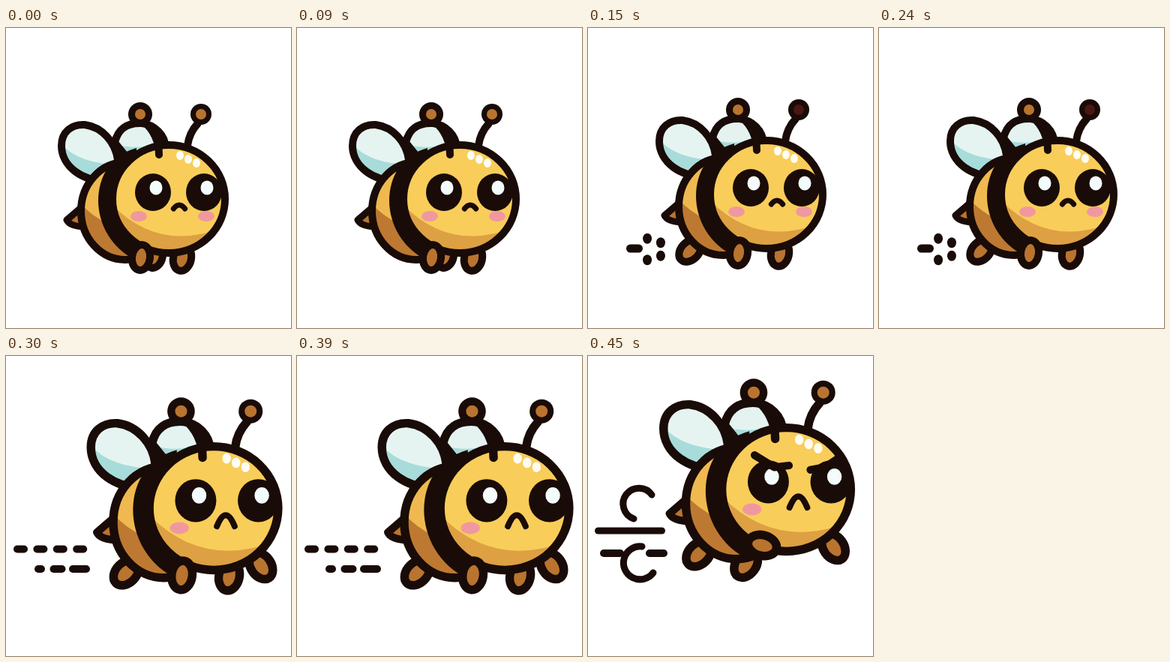
These frames come from a looping animation (380 px wide and 400 px high, 600 ms). An HTML page:

```html
<!DOCTYPE html>
<html lang="en">
<head>
<meta charset="utf-8">
<title>Bee</title>
<style>
  html, body { margin: 0; width: 100%; height: 100%; overflow: hidden; background: #fff; }
  svg { display: block; width: 380px; height: 400px; }
</style>
</head>
<body>
<svg id="stage" viewBox="0 0 380 400"></svg>
<script>
const INK = '#190b07', BROWN = '#b9742f', PINK = '#f0989f', STEP = 150;

const ellipse = (x, y, rx, ry = rx, fill = INK, extra = '') =>
  `<ellipse cx="${x}" cy="${y}" rx="${rx}" ry="${ry}" fill="${fill}" ${extra}/>`;
const shape = (d, fill, width = 0) =>
  `<path d="${d}" fill="${fill}" stroke="${INK}" stroke-width="${width}" stroke-linecap="round" stroke-linejoin="round"/>`;
const line = (d, width = 10) => shape(d, 'none', width);
const dash = (x, length, y, width = 10) => line(`M${x + width / 2} ${y}h${length - width}`, width);
const oval = (x, y, rx, ry) =>
  `M${x - rx} ${y}a${rx} ${ry} 0 1 1 ${2 * rx} 0a${rx} ${ry} 0 1 1 ${-2 * rx} 0Z`;
const repeat = (n, draw) => Array.from({ length: n }, (_, i) => draw(i)).join('');

// A filled shape with a second tone clipped inside it and an outline on top
const shaded = (id, d, fill, shade, tone) =>
  `<clipPath id="${id}"><path d="${d}"/></clipPath>${shape(d, fill)}` +
  `<g clip-path="url(#${id})">${shape(shade, tone)}</g>${line(d)}`;

const feeler = (x, r, stem, tip) => line(stem) + ellipse(x, 115, r) + ellipse(x, 115, 7, 7, tip);
const leg = ([x, y, turn]) =>
  ellipse(x, y, 12, 17, BROWN, `stroke="${INK}" stroke-width="10" transform="rotate(${turn} ${x} ${y})"`);
const eye = x => ellipse(x, 219, 24, 25) + ellipse(x + 4, 213, 8.5, 9.5, '#f4fbfb');
const cheek = x => ellipse(x, 251, 11, 7, PINK);
const frown = depth => {
  const w = 6 + depth / 3;
  return line(`M${231 - w} ${236 + depth}q${w} ${-2 * depth} ${2 * w} 0`, 7);
};

const wings =
  shaded('backWing', 'M145 153C149 134 162 126 181 127C198 129 212 142 213 160L200 174H162Z',
    '#e4f3f0', 'M140 153Q168 164 205 154V180H140Z', '#a9dcd9') +
  shaded('frontWing', 'M140 203C102 207 74 184 74 157C74 138 88 128 105 129C128 132 146 152 149 176Z',
    '#e6f4f1', 'M72 153Q96 182 154 182V210H72Z', '#a8dcda');
const body =
  shape('M102 238L81 256Q85 265 108 265Z', BROWN, 9) +
  shaded('abdomen', oval(159, 244, 59, 65), '#efb950', 'M95 228Q120 264 190 278V320H95Z', '#bd7931') +
  shape('M174 160C106 178 106 278 174 310Z', INK);
const head =
  shaded('face', oval(217, 228, 75, 72), '#f9cd5a', 'M138 232Q205 304 300 262V310H138Z', '#dda043') +
  repeat(3, i => ellipse(232 + 11 * i, 170 + 5 * i, 5, 6, '#fffdf2'));
const brows = line('M180 188L203 202L220 200', 9) + line('M280 190L262 202L245 205', 9);

const legs = {
  hind: [115, 303, 45], front: [180, 306, 8], inner: [197, 303, 10],
  mid: [235, 307, 12], far: [272, 295, -35], tucked: [170, 315, 35], paw: [189, 293, 105]
};

const puff = dash(51, 22, 294, 11) + repeat(4, i => {
  const a = Math.PI + (i + 1) * Math.PI * 0.4;
  return ellipse(84 + 16 * Math.cos(a), 295 + 15 * Math.sin(a), 6, 7);
});
const dashes = repeat(4, i => dash(10 + 26.4 * i, 19, 257.5)) +
  repeat(3, i => dash(38 + 18 * i + 2.5 * i * i, 14 + 7 * i, 284));
const swirls = line('M85 185A21 21 0 1 0 61 217', 9) + dash(9, 94, 233, 9) +
  dash(16, 32, 263) + dash(77, 29, 263) + line('M72 254A22 22 0 1 0 87 289', 9);

// Place and size of the bee, legs behind and in front, and what else shows
const calm = { size: 1, gap: 68, frown: 5, cheeks: [177, 267] };
const rush = { size: 1.145, gap: 73, frown: 13, cheeks: [177] };
const poses = [
  { ...calm, x: 0, y: 0, back: ['inner', 'mid'], front: 'front' },
  { ...calm, x: 21, y: -6, back: ['hind', 'mid'], front: 'front', trail: puff, tip: '#4c1711' },
  { ...rush, x: 28.5, y: -58, back: ['hind', 'mid', 'far'], front: 'front', trail: dashes },
  { ...rush, x: 16, y: -83, back: ['hind', 'tucked', 'far'], front: 'paw', trail: swirls, brows }
];

const draw = p => `<g visibility="hidden">${p.trail || ''}
  <g transform="translate(${p.x} ${p.y}) scale(${p.size})">
    <use href="#wings"/>${p.back.map(name => leg(legs[name])).join('')}<use href="#trunk"/>
    ${feeler(179, 16, 'M183 124Q204 142 204 169', BROWN)}
    ${feeler(260, 14, 'M256 127Q244 140 242 157', p.tip || BROWN)}
    ${p.cheeks.map(cheek).join('')}${eye(196)}${eye(196 + p.gap)}
    ${frown(p.frown)}${p.brows || ''}${leg(legs[p.front])}
  </g></g>`;

const stage = document.getElementById('stage');
stage.innerHTML = `<defs><g id="wings">${wings}</g><g id="trunk">${body}${head}</g></defs>` +
  poses.map(draw).join('');
const views = [...stage.children].slice(1);
const start = performance.now();

function tick() {
  const now = Math.floor((performance.now() - start) / STEP) % views.length;
  views.forEach((v, i) => v.setAttribute('visibility', i === now ? 'visible' : 'hidden'));
  requestAnimationFrame(tick);
}
tick();
</script>
</body>
</html>
```
